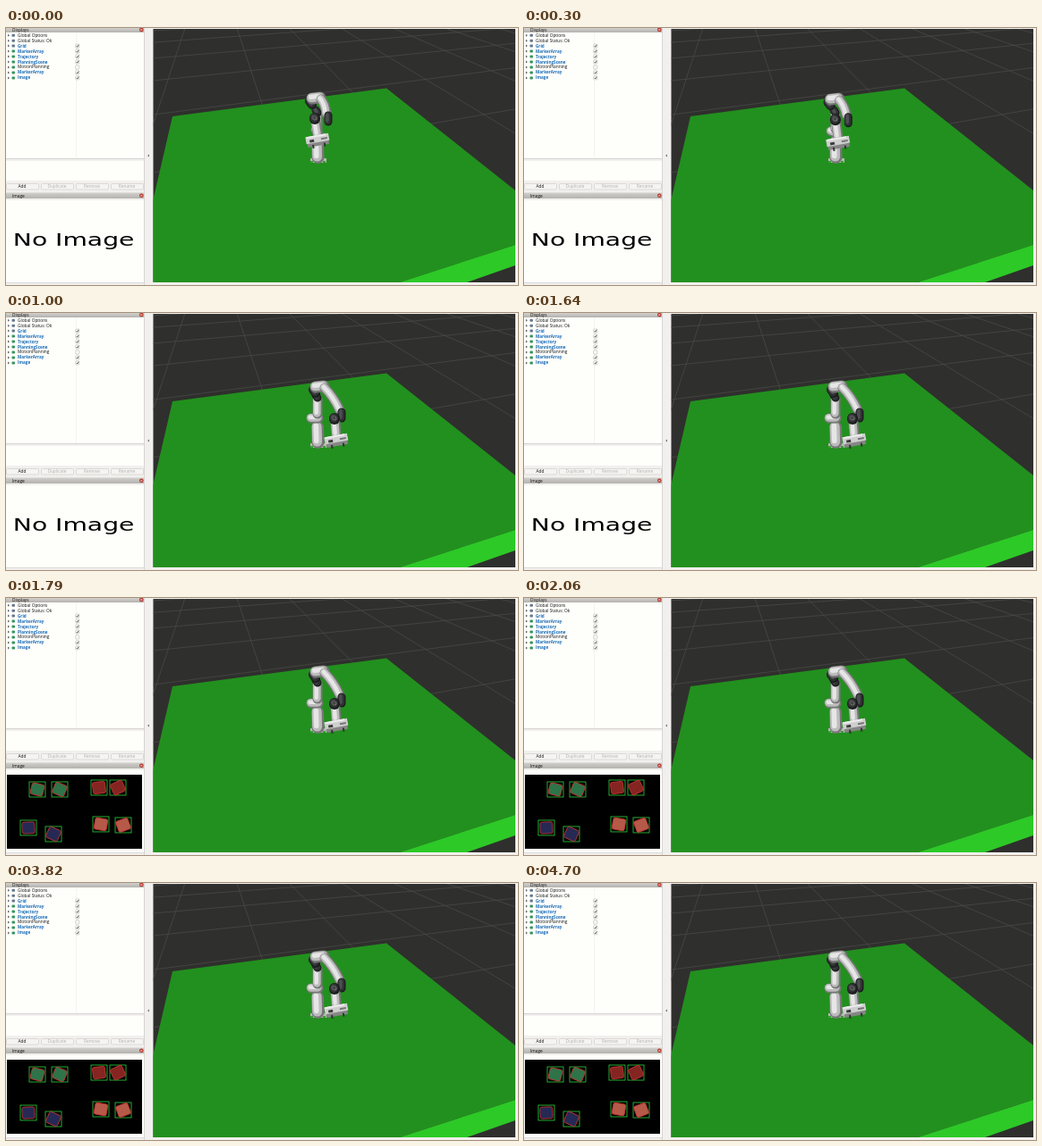
These frames come from a looping animation (572 by 288 pixels, 5000 ms). An HTML page with a canvas:

```html
<!DOCTYPE html>
<html lang="en">
<head>
<meta charset="utf-8">
<title>Robot arm viewer</title>
<style>
html, body { margin: 0; width: 100%; height: 100%; overflow: hidden; background: #f1f0ee; }
svg, canvas { position: absolute; left: 0; top: 0; width: 572px; height: 288px; }
text { font: 4.8px "Open Sans", "Noto Sans", sans-serif; fill: #111; }
.link { font-weight: 700; font-size: 4.6px; fill: #1a6cb8; }
.off { fill: #b3b1ae; }
.mid { text-anchor: middle; }
.big { font: 20px "DejaVu Sans", sans-serif; fill: #000; }
</style>
</head>
<body>
<svg viewBox="0 0 572 288">
  <defs>
    <linearGradient id="bar" x2="0" y2="1"><stop stop-color="#d2d0cc"/><stop offset="1" stop-color="#b4b2ae"/></linearGradient>
    <clipPath id="view"><rect x="164.5" y="1" width="404.5" height="284"/></clipPath>
  </defs>

  <rect width="154" height="5" fill="url(#bar)"/>
  <text x="7" y="3.6">Displays</text>
  <rect y="5" width="154" height="141" fill="#fefefb"/>
  <path d="M78.5 5V146" stroke="#f3f3f0"/>
  <path d="M154.5 0V288M0 146.5H154" stroke="#d6d4d1"/>
  <g id="tree"></g>
  <rect y="149" width="154" height="22" fill="#fefefb"/>
  <g id="buttons"></g>
  <rect y="184.5" width="154" height="6.5" fill="url(#bar)"/>
  <text x="7" y="189.5">Image</text>
  <g id="close"></g>
  <rect y="193" width="154" height="93" fill="#fefefb"/>
  <path d="M0 285.5H154" stroke="#dddbd8"/>

  <text id="empty" class="big" transform="translate(7.8 243.5) scale(1.41 1)">No Image</text>
  <g id="camera"><rect x="1" y="198" width="151" height="83"/></g>

  <path d="M160 141.5l-2 1.5l2 1.5z" fill="#777"/>
  <g clip-path="url(#view)">
    <rect x="164" y="1" width="405" height="284" fill="#2f2f2d"/>
    <path id="grid" fill="none" stroke="#4d4d4b" stroke-width=".7"/>
    <path d="M186 99L425 67.5L569 182V243L440 285H164V194z" fill="#22901e"/>
    <path d="M440 285L569 243V266L515 285z" fill="#2dc927"/>
  </g>
</svg>
<canvas id="arm" width="572" height="288"></canvas>

<script>
const $ = id => document.getElementById(id);
const add = (id, markup) => $(id).insertAdjacentHTML('beforeend', markup);

// Display tree: a leading * marks an enabled, highlighted entry.
['Global Options', 'Global Status: Ok', '*Grid', '*MarkerArray', '*Trajectory',
 '*PlanningScene', 'MotionPlanning', '*MarkerArray', '*Image'].forEach((name, i) => {
  const y = 8.2 + i * 5.96, on = name[0] === '*';
  add('tree', `<path d="M2 ${y - 1.5}l2 1.5l-2 1.5z" fill="#666"/>
    <rect x="6.5" y="${y - 1.5}" width="3.5" height="3" rx="1" fill="${i < 3 ? '#66788c' : '#35965a'}"/>
    <text x="13" y="${y + 1.5}" class="${on ? 'link' : ''}">${name.replace('*', '')}</text>`);
  if (i > 1) add('tree', `<rect x="77.8" y="${y - 2}" width="4" height="4" rx=".6" fill="#fff" stroke="#b5b2ae" stroke-width=".6"/>`);
  if (on) add('tree', `<path d="M78.7 ${y}l1 1.1l1.5 -2.4" fill="none" stroke="#333" stroke-width=".8"/>`);
});

['Add', 'Duplicate', 'Remove', 'Rename'].forEach((name, i) => {
  const x = 18 + i * 39;
  add('buttons', `<rect x="${x - 17.5}" y="174.5" width="36" height="6.5" rx="1" fill="#f5f4f2" stroke="#d2cfcb" stroke-width=".7"/>
    <text x="${x}" y="179.2" class="mid ${i ? 'off' : ''}">${name}</text>`);
});

for (const y of [2, 187.8])
  add('close', `<circle cx="151.3" cy="${y}" r="2.3" fill="#b8392f"/>
    <path d="M150.4 ${y - .9}l1.8 1.8m0 -1.8l-1.8 1.8" stroke="#fff" stroke-width=".6"/>`);

// Detected pieces come in pairs of one colour: x, y and the offset of the second box.
[['#2f7349', 26, 206, 25, 0], ['#842522', 95, 204, 21, 0],
 ['#262953', 16, 249, 28, 7], ['#b55a49', 97, 245, 25, 1]].forEach(([fill, x, y, dx, dy], pair) => {
  for (const k of [0, 1]) {
    const left = x + k * dx, top = y + k * dy, w = 18, h = 17;
    const turn = 25 * Math.sin(2.8 * pair + 1.4 * k + .6);
    add('camera', `<rect x="${left}" y="${top}" width="${w}" height="${h}" fill="none" stroke="#28bd35" stroke-width=".9"/>
      <rect x="${left + 2}" y="${top + 2}" width="${w - 4}" height="${h - 4}" rx="2" fill="${fill}"
        stroke="#cf3434" stroke-width=".8" transform="rotate(${turn} ${left + w / 2} ${top + h / 2})"/>`);
  }
});

// Ground lines run towards two vanishing points on the same horizon.
const horizon = -88;
let ground = '';
for (let x = 26; x < 700; x += 58)
  ground += `M229 ${horizon}L${229 + (x - 229) * 5} ${horizon + 88 * 5}`;
for (let k = .011; k > .002; k -= .0014)
  ground += `M164 ${horizon + 1 / k}L1586 ${horizon}`;
$('grid').setAttribute('d', ground);

const ctx = $('arm').getContext('2d');
ctx.lineCap = 'round';
const WHITE = ['#777777', '#bcbcbc', '#e6e6e6'], DARK = ['#1c1d1e', '#303133', '#4c4e51'];

// Joint positions at the three key poses; every link is derived from them.
const joints = {
  shoulder: [[346, 114], [341, 117], [341, 118]],
  elbow: [[347, 78], [348, 80], [351, 82]],
  wrist: [[360, 101], [364, 104], [375, 114]],
  flange: [[345, 101], [350, 103], [367, 118]],
  hand: [[348, 125], [353, 130], [369, 142]]
};
const poseTimes = [0, 520, 1000];

function poseAt(time) {
  const i = time < poseTimes[1] ? 0 : 1;
  const f = Math.min(1, (time - poseTimes[i]) / (poseTimes[i + 1] - poseTimes[i]));
  const pose = {};
  for (const [name, keys] of Object.entries(joints))
    pose[name] = keys[i].map((v, n) => v + (keys[i + 1][n] - v) * f);
  return pose;
}

const shift = ([x, y], dx, dy) => [x + dx, y + dy];

// A rounded link, lit from the upper left; bow bends it outwards.
function link(colours, from, to, width, bow = 0) {
  colours.forEach((colour, i) => {
    const light = -i * width * .06;
    const a = shift(from, light, light), b = shift(to, light, light);
    ctx.strokeStyle = colour;
    ctx.lineWidth = width * [1, .78, .4][i];
    ctx.beginPath();
    ctx.moveTo(...a);
    ctx.quadraticCurveTo((a[0] + b[0]) / 2 + bow, (a[1] + b[1]) / 2 - bow, ...b);
    ctx.stroke();
  });
}

function box(colour, x, y, w, h) {
  ctx.fillStyle = colour;
  ctx.fillRect(x, y, w, h);
}

function drawHand(at) {
  ctx.save();
  ctx.translate(...at);
  ctx.rotate(-.18);
  box('#858685', -12, 2, 24, 5);
  box('#cfcfcf', -13, -5, 26, 8);
  box('#ececec', -12, -5, 22, 2);
  box('#3c3c3c', -9, -1, 5, 3);
  box('#777', 4, -1, 7, 2);
  for (const x of [-7, 6]) box('#333', x, 5, 2, 4);
  ctx.restore();
}

function drawArm(time) {
  const { shoulder, elbow, wrist, flange, hand } = poseAt(time);
  const waist = [348, 118];
  ctx.clearRect(0, 0, 572, 288);
  box('#b4bab2', 340, 146, 18, 5);
  for (const x of [340, 345, 354]) box('#38a033', x, 149, 3, 2);
  link(WHITE, [348, 128], [348.5, 145], 14);
  link(WHITE, shoulder, shift(waist, 1, 0), 11);
  link(WHITE, shift(waist, 0, -5), [348, 96], 11);
  link(DARK, [346, 92], [348, 95], 9);
  link(DARK, shift(elbow, -8, 4), shift(elbow, -5, 8), 10);
  link(WHITE, shift(elbow, -5, 1), shift(elbow, 4, 0), 13);
  link(WHITE, shift(elbow, 5, 2), shift(wrist, -2, -5), 11, 2);
  link(DARK, shift(wrist, 0, -3), shift(wrist, 0, 4), 9);
  link(WHITE, shift(flange, 1, 5), shift(hand, 0, -6), 11);
  link(DARK, flange, shift(flange, 0, 1), 12);
  link(['#777', '#444'], flange, flange, 5);
  drawHand(hand);
}

const start = performance.now();
function frame() {
  const time = (performance.now() - start) % 5000, live = time >= 1670;
  $('camera').style.display = live ? '' : 'none';
  $('empty').style.display = live ? 'none' : '';
  drawArm(time);
  requestAnimationFrame(frame);
}
frame();
</script>
</body>
</html>
```
